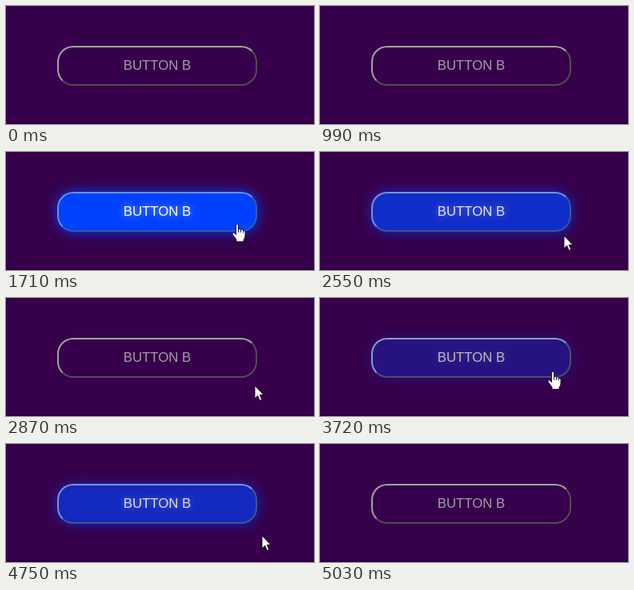
Recreate the animation shown at these times as an HTML page. Size 385 by 148 pixels, loop 5340 ms.

```html
<!DOCTYPE html>
<html lang="en">
<head>
<meta charset="utf-8">
<title>Glowing button</title>
<style>
  html, body { margin: 0; width: 100%; height: 100%; overflow: hidden; background: #36004b; }
  #stage {
    --p: 0%;
    position: relative; width: 385px; height: 148px; overflow: hidden;
    background: linear-gradient(#36004b 146px, #1c0028 148px);
  }
  #button {
    --light: color-mix(in srgb, #5c8eff var(--p), #a5a0a5);
    --dark: color-mix(in srgb, #3c5a98 var(--p), #514c51);
    position: absolute; left: 64px; top: 50px; width: 250px; height: 50px;
    box-sizing: border-box; border: 2px solid; border-radius: 20px;
    border-color: var(--light) var(--dark) var(--dark) var(--light);
    background: color-mix(in srgb, #0040ff var(--p), #36004b);
    box-shadow: 0 0 15px color-mix(in srgb, #0040ff var(--p), transparent);
    color: color-mix(in srgb, #fff var(--p), #a39ca6);
    text-shadow: 0 0 10px color-mix(in srgb, #ffffff90 var(--p), transparent);
    font: 16.8px/45px "Liberation Sans", Arial, sans-serif; text-align: center;
  }
  svg { position: absolute; left: 0; top: 0; }
  #cursor path { fill: #fff; stroke: #180020; stroke-width: .9; stroke-linejoin: round; }
</style>
</head>
<body>
<div id="stage">
  <div id="button">BUTTON B</div>
  <svg width="385" height="148">
    <g id="cursor">
      <path id="arrow" d="M0 0V16L3.7 12.5L6.2 18.5L8.8 17.4L6.3 11.6H11Z"/>
      <g id="hand">
        <path d="M-1.5 1.5Q0 -1 1.5 1.5V7Q3 5.5 4.5 7.5Q6.5 6.5 7.5 8.5Q10 8 10 10.5V15Q10 18 8 20V22.5H-1V20L-6 13Q-6.5 10.5 -4.5 11L-1.5 13.5Z"/>
        <path d="M1.5 7V11M4.5 7.5V11M7.5 8.5V11.5"/>
      </g>
    </g>
  </svg>
</div>
<script>
  const LOOP = 5340, FADE = 400;
  const HOVERS = [[1310, 2470], [3640, 4660]];
  // Pointer moves: [start, end, from, to, eased]
  const MOVES = [
    [990, 1360, [341, 148], [288, 90]],
    [1360, 1510, [288, 90], [289, 90]],
    [2350, 2650, [289, 90], [311, 110], true],
    [3440, 3780, [311, 110], [289, 90], true],
    [4560, 4660, [289, 90], [301, 98]],
    [4660, 4750, [301, 98], [320, 115]],
    [4750, 4860, [320, 115], [342, 150]]
  ];
  const $ = id => document.getElementById(id);
  const clamp = v => Math.min(1, Math.max(0, v));

  // CSS "ease": cubic-bezier(.25, .1, .25, 1)
  function ease(x) {
    const bezier = (s, a, b) => 3 * s * (1 - s) ** 2 * a + 3 * s * s * (1 - s) * b + s ** 3;
    let lo = 0, hi = 1;
    for (let i = 0; i < 20; i++) {
      const mid = (lo + hi) / 2;
      if (bezier(mid, .25, .25) < x) lo = mid; else hi = mid;
    }
    return bezier(lo, .1, 1);
  }

  function pointer(t) {
    const move = MOVES.findLast(m => t >= m[0]);
    if (!move) return [341, 160];
    const [start, end, from, to, eased] = move;
    let k = clamp((t - start) / (end - start));
    if (eased) k = k * k * (3 - 2 * k);
    return from.map((v, i) => v + (to[i] - v) * k);
  }

  function draw(now) {
    const t = now % LOOP;
    let glow = 0, over = false;
    for (const [enter, leave] of HOVERS) {
      glow += ease(clamp((t - enter) / FADE)) - ease(clamp((t - leave) / FADE));
      over ||= t >= enter && t < leave;
    }
    $("stage").style.setProperty("--p", clamp(glow) * 100 + "%");
    const [x, y] = pointer(t).map(Math.round);
    $("cursor").setAttribute("transform", `translate(${x} ${y})`);
    $("arrow").style.display = over ? "none" : "";
    $("hand").style.display = over ? "" : "none";
  }

  const begin = performance.now();
  function tick() {
    draw(performance.now() - begin);
    requestAnimationFrame(tick);
  }
  tick();
</script>
</body>
</html>
```
